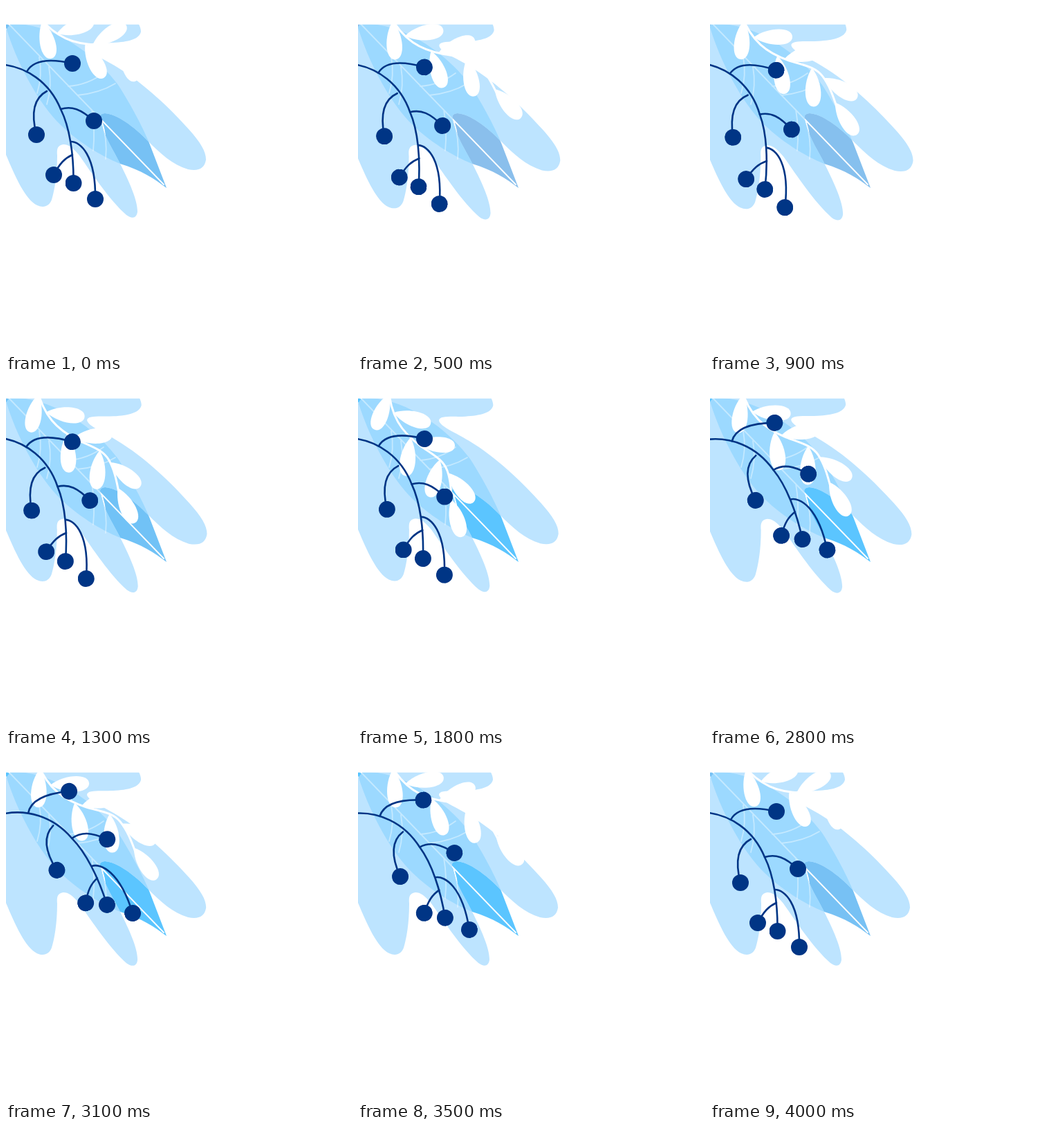
Write an HTML page that moves like this. It is 500 px wide and 500 px high and loops after 4.1 s.

```html
<!DOCTYPE html>
<html lang="en">
<head>
<meta charset="utf-8">
<title>Swaying leaves and berries</title>
<style>
  html, body { margin: 0; width: 100%; height: 100%; overflow: hidden; background: #fff; }
  svg { display: block; width: 100vw; height: 100vh; }
</style>
</head>
<body>
<svg viewBox="0 0 500 500" fill="none" stroke-linecap="round">
  <defs>
    <path id="leafShape" d="M0 24 L28 27 C85 36 135 78 162 114 C182 145 200 180 207 198 L232 263 C215 250 195 237 165 228 C138 217 102 196 73 166 C43 133 15 80 0 31Z"/>
    <path id="blobShape" d="M-20 60 L0 35 L6 27 L20 10 L182 10 C190 22 195 30 195 37 C193 48 176 52 155 53 C138 54 117 51 117 59 C119 68 141 76 160 88 C200 112 238 149 264 178 C281 197 289 210 289 222 C287 235 278 239 263 236 C240 229 223 213 205 195 C185 174 160 156 143 155 C132 156 136 163 139 174 C145 194 154 206 165 228 C178 254 190 280 190 297 C189 307 182 308 174 302 C150 281 125 243 106 216 C96 204 90 200 83 200 C75 201 73 206 74 216 C74 245 70 267 66 280 C62 290 54 292 45 288 C28 280 13 246 0 215 L-20 160Z"/>
    <path id="veins" stroke="#fff" stroke-width="1.8" d="M2 24 L228 258 M48 74 Q53 100 45 126 M62 88 Q67 115 59 142 M90 116 Q118 114 141 97 M103 129 Q135 126 158 112 M124 150 Q129 178 126 209 M138 165 Q147 193 144 221"/>
    <clipPath id="covered"><use id="blobClip" href="#blobShape"/></clipPath>
    <marker id="berry" markerUnits="userSpaceOnUse" markerWidth="24" markerHeight="24" refX="12" refY="12">
      <circle cx="12" cy="12" r="12" fill="#003585"/>
    </marker>
  </defs>
  <use id="leaf" href="#leafShape"/>
  <use href="#veins"/>
  <use id="blob" href="#blobShape" fill="#bde4ff"/>
  <g clip-path="url(#covered)">
    <use href="#leafShape" fill="#9cd9ff"/>
    <use href="#veins" opacity=".4"/>
  </g>
  <g id="sprig">
    <path id="stem" stroke="#fff" stroke-width="3" d="M44 10 C47 52 62 74 90 95 C110 109 123 115 129 131 C134 145 135 160 135 185"/>
  </g>
  <g id="berries" stroke="#003585" stroke-width="2.6" marker-end="url(#berry)">
    <path d="M-15 82 L-2 85 C28 89 62 108 79 149 C92 175 98 215 97.5 256"/>
    <path d="M30 95 C38 80 60 75 96 83"/>
    <path d="M79 149 C95 144 108 149 127 166"/>
    <path d="M59 123 C40 133 36 155 44 186"/>
    <path d="M96 215 C85 220 78 227 69 244"/>
    <path d="M94 196 C107 196 130 215 129 279"/>
  </g>
  <path fill="#fff" d="M0 0H500V26.7H0Z"/>
</svg>
<script>
const el = id => document.getElementById(id);
const turn = (id, angle, x, y) => el(id).setAttribute("transform", `rotate(${angle} ${x} ${y})`);

// Petals grow from the stem: distance along it, then direction in degrees.
const petals = [[10, 112], [38, 17], [82, 97], [93, 5], [135, 105], [158, 49], [197, 74]];
for (const [distance, angle] of petals) {
  const { x, y } = el("stem").getPointAtLength(distance);
  const petal = document.createElementNS("http://www.w3.org/2000/svg", "path");
  petal.setAttribute("d", "M0 0C21 -15 56 -15 56 0C56 15 21 15 0 0");
  petal.setAttribute("fill", "#fff");
  petal.setAttribute("transform", `translate(${x} ${y}) rotate(${angle})`);
  el("sprig").append(petal);
}

// Linear interpolation through [time, value] pairs.
function ramp(t, ...keys) {
  const i = Math.max(1, keys.findIndex(key => key[0] >= t));
  const [t0, v0] = keys[i - 1], [t1, v1] = keys[i];
  return v0 + (v1 - v0) * (t - t0) / (t1 - t0);
}

function draw(now) {
  const t = Math.floor(now % 4100 / 100) * 100;

  // The pale leaf swells twice, then rests.
  const swell = t < 3200 ? (1 - Math.cos(t / 800 * Math.PI)) / 2 : 0;
  const scale = `translate(100 150) scale(${1 + 0.025 * swell}) translate(-100 -150)`;
  el("blob").setAttribute("transform", scale);
  el("blobClip").setAttribute("transform", scale);

  turn("sprig", ramp(t, [0, -35.6], [1900, 2], [4000, -35.6]), 51, 9);
  turn("berries", ramp(t, [0, 0], [900, 5.9], [1800, 1.2], [2380, 14.4], [2930, -21.4], [4000, 0]), 1.5, 84);

  const tint = Math.max(0, Math.cos((t - 600) / 2000 * Math.PI));
  el("leaf").setAttribute("fill", `rgb(${91 + 48 * tint},${197 - 6 * tint},${255 - 19 * tint})`);
  requestAnimationFrame(draw);
}
requestAnimationFrame(draw);
</script>
</body>
</html>
```
